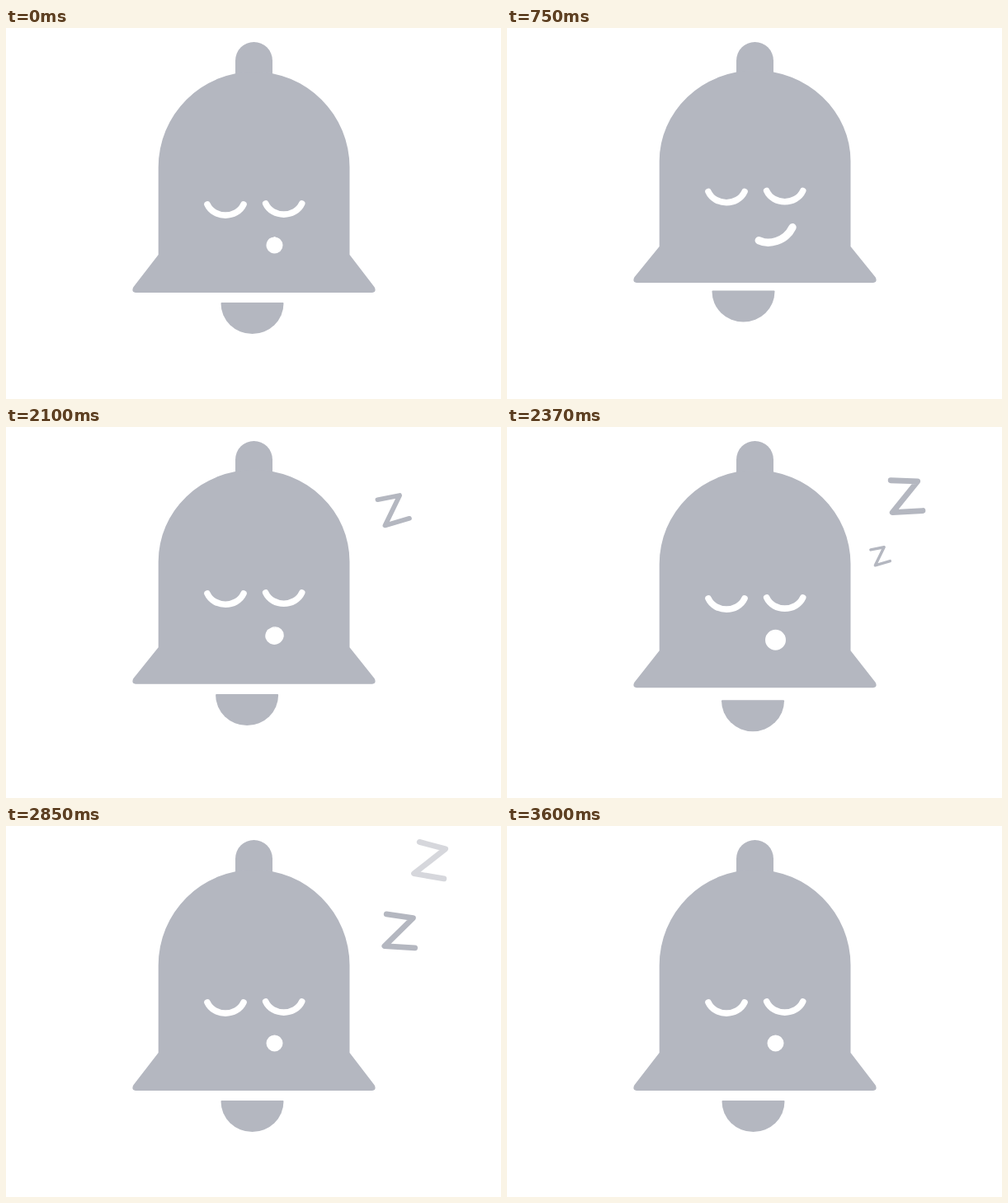
Recreate the animation shown at these times as an HTML page. Size 600 by 450 pixels, loop 3.63 s.

```html
<!DOCTYPE html>
<html lang="en">
<head>
<meta charset="utf-8">
<title>Sleeping bell</title>
<style>
html, body { margin: 0; width: 100%; height: 100%; overflow: hidden; background: #fff; }
svg { display: block; width: 600px; height: 450px; }
.line { fill: none; stroke-linecap: round; stroke-linejoin: round; }
</style>
</head>
<body>
<svg viewBox="0 0 600 450">
  <g fill="#b4b7c0">
    <path d="M278 60V39.5a22.5 22.5 0 0 1 45 0V60z"/>
    <path id="body"/>
    <path id="clapper" d="M-37 0H37Q38 0 38 1A38 37 0 0 1 -38 1Q-38 0 -37 0z"/>
  </g>
  <g id="eyes" class="line" stroke="#fff" stroke-width="7.6">
    <path d="M244 0.5c8 17.6 36 17.6 44 0"/>
    <path d="M314.7 -0.5c8 17.6 36 17.6 44 0"/>
  </g>
  <path id="mouth" class="line" stroke="#fff"/>
  <g class="line" stroke="#b4b7c0" stroke-width="6.5">
    <path class="zed" d="M-19 -18.5L12 -17.5L-17 18.5L18 16.5"/>
    <path class="zed" d="M-19 -18.5L12 -17.5L-17 18.5L18 16.5"/>
  </g>
</svg>
<script>
const LOOP = 3630, EXHALE = 1770, ZED_LIFE = 1200;
const $ = id => document.getElementById(id);
const zeds = document.querySelectorAll('.zed');

const clamp = v => Math.min(1, Math.max(0, v));
const mix = (a, b, k) => a + (b - a) * k;
const part = (t, from, to) => clamp((t - from) / (to - from));
const ease = (t, from, to) => 0.5 - 0.5 * Math.cos(Math.PI * part(t, from, to));
// 0 = lungs empty, 1 = lungs full
const breath = (t, inEnd, outEnd) => ease(t, 0, inEnd) - ease(t, EXHALE, outEnd);

function set(el, attrs) {
  for (const name in attrs) el.setAttribute(name, attrs[name]);
}

function drawBody(k) {
  const mid = mix(169, 161.5, k), ry = mix(116, 110, k);
  const hip = mix(275, 265, k), foot = mix(321, 309, k);
  set($('body'), {
    d: `M184.7 ${mid}A115.9 ${ry} 0 0 1 416.5 ${mid}V${hip}L446.6 ${foot - 6.7}` +
      `Q449.5 ${foot - 1} 444 ${foot}H157Q151.5 ${foot - 1} 154.4 ${foot - 6.7}L184.7 ${hip}z`
  });
  set($('eyes'), { transform: `translate(0 ${mix(213.4, 198, k)})` });
}

function drawClapper(t) {
  const x = mix(298.5, 286.5, breath(t, 750, 2460));
  const y = mix(333, 318.5, breath(t, 750, 2550));
  set($('clapper'), { transform: `translate(${x} ${y})` });
}

// A smile that collapses into a round snoring mouth
function drawMouth(t, k) {
  const spread = breath(t, 520, 2150);
  const snore = Math.sin(Math.PI * part(t, EXHALE, 2850));
  const y = mix(263.5, 250, k);
  const at = (px, py) => `${325.5 + px * spread} ${y + py * spread}`;
  set($('mouth'), {
    d: `M${at(-20.2, 7.7)}C${at(-8, 13.5)} ${at(12, 9)} ${at(20.5, -8.2)}h0.01`,
    'stroke-width': mix(20, 9.4, breath(t, 330, 2300)) + 5 * snore
  });
}

// Each letter drifts up faster and faster, grows, tips over and fades
function drawZed(el, age, dx, dy) {
  const p = clamp(age / ZED_LIFE);
  const x = 455 + 50 * p + 20 * p * p + dx;
  const y = 113 - 32 * p - 51 * p * p + dy;
  const turn = mix(-13, 13, ease(p, 0.3, 0.7));
  const scale = 1.05 * part(p, 0, 0.33);
  set(el, {
    opacity: 1 - part(p, 0.82, 1),
    transform: `translate(${x} ${y}) rotate(${turn}) scale(${scale})`,
    visibility: p > 0 ? 'visible' : 'hidden'
  });
}

function draw(t) {
  const k = breath(t, 670, 2820);
  drawBody(k);
  drawClapper(t);
  drawMouth(t, k);
  drawZed(zeds[0], t - EXHALE, 0, 0);
  drawZed(zeds[1], t - EXHALE - 400, -11, 50);
}

const start = performance.now();
function tick() {
  draw((performance.now() - start) % LOOP);
  requestAnimationFrame(tick);
}
tick();
</script>
</body>
</html>
```
